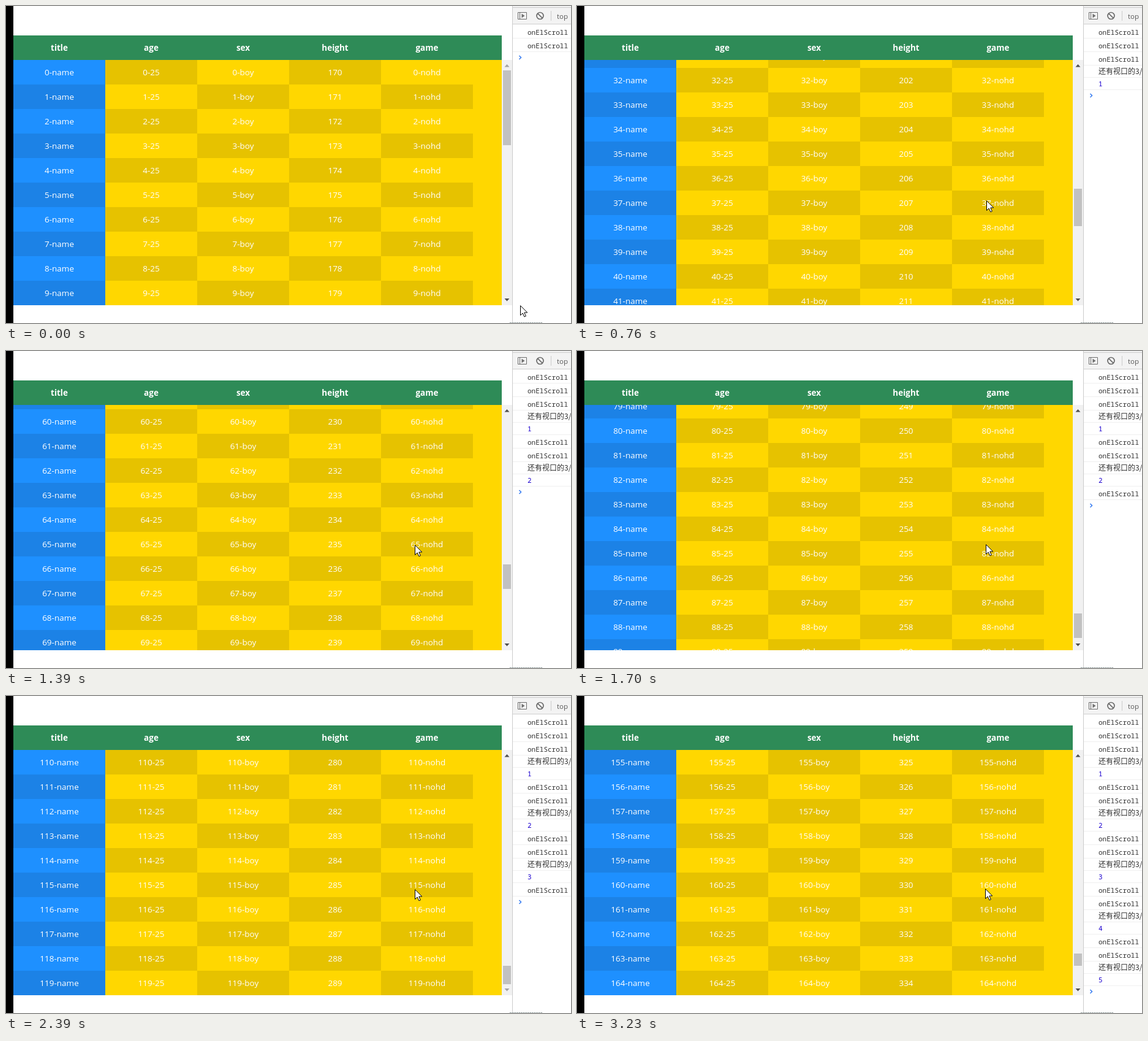
Write an HTML page that moves like this. It is 922x517 px and loops after 3310 ms.

```html
<!DOCTYPE html>
<html lang="en">
<head>
<meta charset="utf-8">
<title>Endless table</title>
<style>
  html, body { margin: 0; width: 100%; height: 100%; overflow: hidden; background: #fff; }
  svg { display: block; }
  text { white-space: pre; }
  .cell { font: 13.5px "Open Sans", "Noto Sans", sans-serif; fill: #fff; text-anchor: middle; }
  .head { font-weight: 700; }
  .log { font: 11px "Noto Sans Mono", "DejaVu Sans Mono", monospace; fill: #303030; }
  .cjk { font: 12px "Noto Sans CJK SC", "Noto Sans CJK", sans-serif; }
  .num { fill: #1c00cf; }
  .tool { font: 11.5px "Open Sans", sans-serif; fill: #5a5a5a; }
</style>
</head>
<body>
<svg id="stage" viewBox="0 0 922 517" width="100%" height="100%"></svg>
<script>
const NS = "http://www.w3.org/2000/svg";
const stage = document.getElementById("stage");

function add(parent, tag, attrs = {}, text) {
  const el = document.createElementNS(NS, tag);
  for (const k in attrs) el.setAttribute(k, attrs[k]);
  if (text !== undefined) el.textContent = text;
  parent.appendChild(el);
  return el;
}
const rect = (parent, x, y, width, height, fill) =>
  add(parent, "rect", { x, y, width, height, fill, "shape-rendering": "crispEdges" });
const move = (el, x, y) => el.setAttribute("transform", `translate(${x} ${y})`);

const LOOP = 3310, STEP = 77, STEPS = 43;
const COL = 150, ROW = 40, LEFT = 12, TOP = 88, VIEW = 400, PAGE = 30;
const BLUE = ["#1e90ff", "#1c82e6"], GOLD = ["#ffd700", "#e6c200"];
const HEADS = ["title", "age", "sex", "height", "game"];

// [step, value...] keys
const SCROLL = [[0, 0], [5, 0], [6, 652], [7, 800], [8, 800], [11, 1500], [12, 1500],
  [13, 1800], [14, 1986], [15, 2000], [16, 2000], [22, 3178], [23, 3200], [24, 3200],
  [30, 4390], [31, 4400], [32, 4400], [37, 5468], [38, 5600], [39, 5600], [42, 6200]];
const POINTER = [[0, 839, 488], [5, 668, 317], [7, 668, 317], [14, 667, 316],
  [22, 667, 315], [31, 667, 315], [37, 666, 314]];
const LOADS = [8, 16, 24, 32, 39];
const SCROLLED = [13, 19, 27, 35];

function sample(keys, t, i = 1) {
  const n = keys.findIndex(k => k[0] > t);
  if (n < 0) return keys[keys.length - 1][i];
  const a = keys[n - 1], b = keys[n];
  return Math.round(a[i] + (b[i] - a[i]) * (t - a[0]) / (b[0] - a[0]));
}

// Table
rect(stage, 0, 0, 922, 517, "#fff");
rect(stage, 0, 0, LEFT, 517, "#000");
rect(stage, LEFT, 48, 797, 40, "#2e8b57");
HEADS.forEach((h, c) => add(stage, "text", { class: "cell head", x: 87 + c * COL, y: 73 }, h));

const body = add(stage, "svg", { x: LEFT, y: TOP, width: 797, height: VIEW, overflow: "hidden" });
rect(body, 0, 0, 797, VIEW, GOLD[0]);
const rows = Array.from({ length: 11 }, () => {
  const g = add(body, "g");
  const cells = HEADS.map((_, c) => ({
    box: rect(g, c * COL, 0, COL, ROW, GOLD[0]),
    label: add(g, "text", { class: "cell", x: 75 + c * COL, y: 25 })
  }));
  return { g, cells };
});

// Scrollbar
rect(stage, 809, TOP, 17, VIEW, "#f1f1f1");
const up = add(stage, "path", { d: "M813.5 99.5h8l-4-4.5z" });
const down = add(stage, "path", { d: "M813.5 477h8l-4 4.5z" });
const thumb = rect(stage, 811, 105, 13, 122, "#c1c1c1");

// Console
rect(stage, 826, 0, 1, 517, "#ccc");
rect(stage, 827, 0, 95, 29, "#f3f3f3");
rect(stage, 827, 2, 95, 1, "#ccc");
rect(stage, 827, 29, 95, 1, "#d0d0d0");
const icon = { fill: "none", stroke: "#6e6e6e" };
add(stage, "path", { ...icon, d: "M835.5 10.5h14v11h-14zM838.5 10.5v11" });
add(stage, "path", { d: "M841.5 12.5v7l5-3.5z", fill: "#6e6e6e" });
add(stage, "path", { ...icon, "stroke-width": 1.7,
  d: "M866 16a5.5 5.5 0 1 0 11 0a5.5 5.5 0 1 0-11 0M867.6 12.1l7.8 7.8" });
rect(stage, 889, 8, 1, 16, "#ccc");
add(stage, "text", { class: "tool", x: 899, y: 21 }, "top");

const logs = [];
function log(at, text, gap = 22, cls = "") {
  const y = logs.length ? logs[logs.length - 1].y + gap : 43;
  const g = add(stage, "g");
  add(g, "text", { class: "log " + cls, x: 851, y: y + 4 }, text);
  rect(g, 827, y + 9, 95, 1, "#f0f0f0");
  logs.push({ at, y, g });
}
log(0, "onElScroll");
log(0, "onElScroll");
LOADS.forEach((at, i) => {
  log(at, "onElScroll");
  log(at, "还有视口的3/4", 20, "cjk");
  log(at, i + 1, 20, "num");
  if (i < SCROLLED.length) log(SCROLLED[i], "onElScroll");
});
const prompt = add(stage, "path", { d: "M837.5-3l3 3-3 3", fill: "none", stroke: "#367cf1", "stroke-width": 1.5 });

add(stage, "path", { d: "M822 516.5h53", stroke: "#7f8c8c", "stroke-dasharray": "2 1" });
const pointer = add(stage, "path", { d: "M.5.7v15.8l3.7-3.5 2.7 5.9 2.5-1.1-2.6-5.8h5z", fill: "#fff", stroke: "#000" });

function drawRows(scroll) {
  const first = Math.floor(scroll / ROW);
  rows.forEach(({ g, cells }, i) => {
    const n = first + i;
    const texts = [`${n}-name`, `${n}-25`, `${n}-boy`, 170 + n, `${n}-nohd`];
    move(g, 0, n * ROW - scroll);
    cells.forEach(({ box, label }, c) => {
      box.setAttribute("fill", (c ? GOLD : BLUE)[(n + c) % 2]);
      label.textContent = texts[c];
    });
  });
}

function drawBar(scroll, total) {
  const arrow = on => on ? "#505050" : "#a3a3a3";
  thumb.setAttribute("y", Math.floor(105 + 366 * scroll / total));
  thumb.setAttribute("height", Math.floor(366 * VIEW / total));
  up.setAttribute("fill", arrow(scroll > 0));
  down.setAttribute("fill", arrow(scroll < total - VIEW));
}

function draw(step) {
  const scroll = sample(SCROLL, step);
  const pages = 1 + LOADS.filter(at => at <= step).length;
  drawRows(scroll);
  drawBar(scroll, pages * PAGE * ROW);
  let last = 0;
  for (const { at, y, g } of logs) {
    const shown = at <= step;
    g.setAttribute("visibility", shown ? "visible" : "hidden");
    if (shown) last = y;
  }
  move(prompt, 0, last + 19);
  move(pointer, sample(POINTER, step), sample(POINTER, step, 2));
}

// The screen updates in held steps of about 77 ms
const start = performance.now();
let shown = -1;
function tick() {
  const t = (performance.now() - start) % LOOP;
  const step = Math.min(STEPS - 1, Math.floor((t + 12) / STEP));
  if (step !== shown) draw(shown = step);
  requestAnimationFrame(tick);
}
tick();
</script>
</body>
</html>
```
